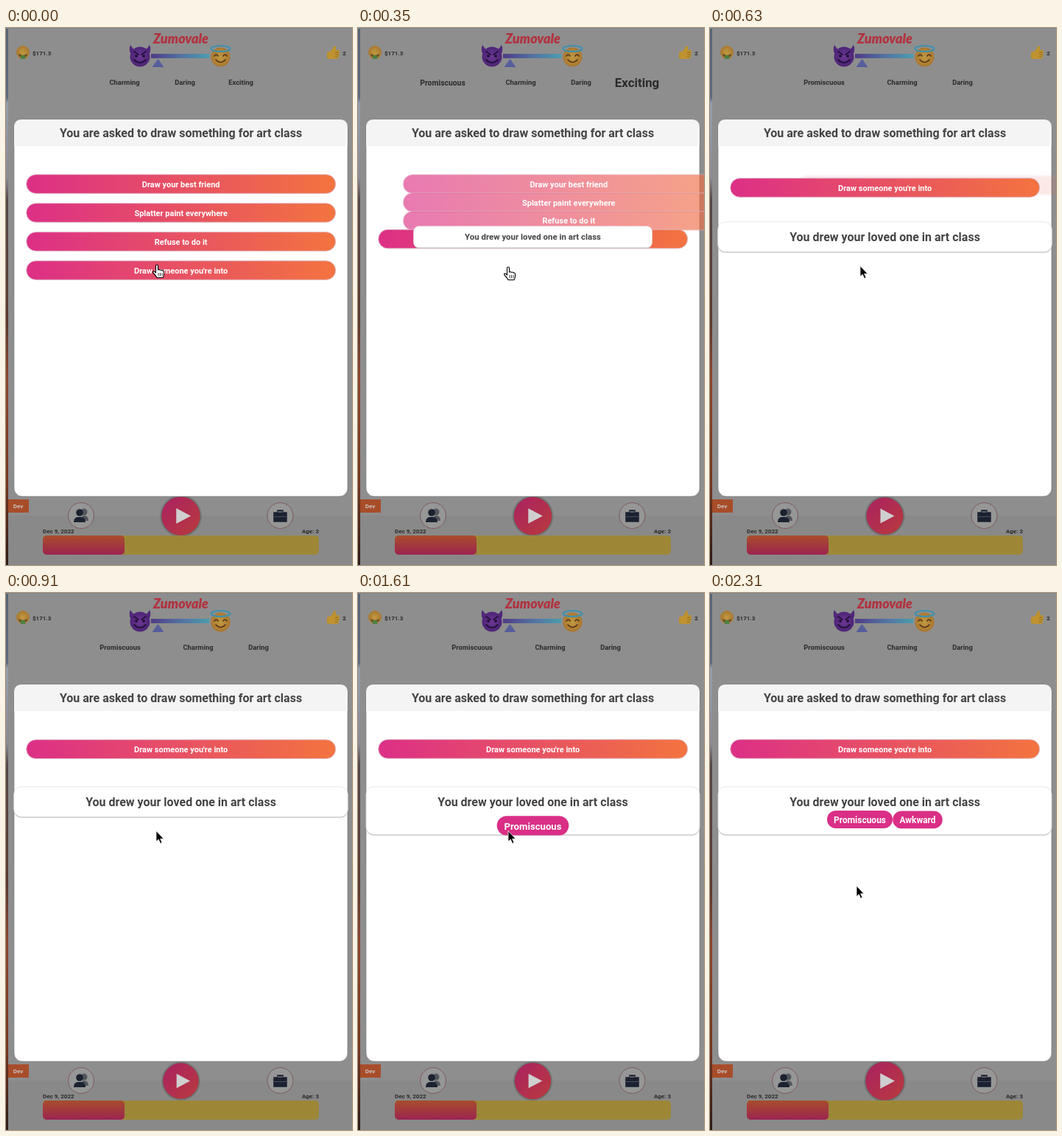
Recreate the animation shown at these times as an HTML page. Size 470 by 728 pixels, loop 2.38 s.

```html
<!DOCTYPE html>
<html lang="en">
<head>
<meta charset="utf-8">
<title>Art class</title>
<style>
  html, body { margin: 0; width: 100%; height: 100%; overflow: hidden; background: #8e8e8e; }
  svg { display: block; width: 100vw; height: 100vh; }
  text { font-family: Roboto, "Liberation Sans", sans-serif; font-weight: 700; }
  .logo { font: italic 900 18px Lato, sans-serif; }
</style>
</head>
<body>
<svg id="stage" viewBox="0 0 470 728">
  <defs>
    <linearGradient id="btn"><stop stop-color="#dc2f87"/><stop offset="1" stop-color="#f3743f"/></linearGradient>
    <linearGradient id="mood"><stop stop-color="#4f3c86"/><stop offset=".5" stop-color="#5470a2"/><stop offset="1" stop-color="#4a9cac"/></linearGradient>
    <linearGradient id="play" x2="1" y2="1"><stop stop-color="#a92262"/><stop offset="1" stop-color="#b93a3c"/></linearGradient>
    <linearGradient id="life" x2="0" y2="1"><stop stop-color="#a94d2c"/><stop offset="1" stop-color="#9c2450"/></linearGradient>
    <linearGradient id="edge" x2="0" y2="1">
      <stop stop-color="#56667a"/><stop offset=".13" stop-color="#5c6c80"/><stop offset=".14" stop-color="#969eac"/>
      <stop offset=".28" stop-color="#8a8c96"/><stop offset=".32" stop-color="#54484a"/><stop offset=".55" stop-color="#5c3a30"/>
      <stop offset=".65" stop-color="#8c4630"/><stop offset=".85" stop-color="#743620"/><stop offset="1" stop-color="#2c1c18"/>
    </linearGradient>
    <radialGradient id="gold"><stop stop-color="#c09a42"/><stop offset="1" stop-color="#a9772f"/></radialGradient>
    <radialGradient id="violet"><stop stop-color="#6c3794"/><stop offset="1" stop-color="#4d2477"/></radialGradient>
    <radialGradient id="halo"><stop offset=".85" stop-opacity=".35"/><stop offset="1" stop-opacity="0"/></radialGradient>
  </defs>

  <rect width="470" height="728" fill="#8e8e8e"/>
  <rect y="661" width="470" height="67" fill="#898989"/>
  <rect width="3" height="728" fill="url(#edge)"/>
  <rect width="470" height="1" fill="#7b8791"/>

  <!-- money face -->
  <circle cx="23" cy="33" r="9" fill="url(#gold)"/>
  <path d="M17 35q6 4 12 0q-1 5-6 5t-6-5" fill="#563b22"/>
  <path d="M20 37h6v5h-6z" fill="#4c8045"/>
  <!-- devil -->
  <g fill="url(#violet)">
    <path d="M170 36q-4-7-1-13q3 6 9 7zM194 36q4-7 1-13q-3 6-9 7z"/>
    <circle cx="182" cy="39" r="13.5"/>
  </g>
  <path d="M174 32l6 4M190 32l-6 4M174 43q8 8 16 0" fill="none" stroke="#25123c" stroke-width="1.8" stroke-linecap="round"/>
  <circle cx="177" cy="38" r="2" fill="#25123c"/><circle cx="187" cy="38" r="2" fill="#25123c"/>
  <!-- mood scale -->
  <rect x="197" y="35" width="79" height="6" fill="url(#mood)"/>
  <path d="M206.500 42l8 11h-16z" fill="#565f9c"/>
  <!-- angel -->
  <circle cx="291.500" cy="39.500" r="13" fill="url(#gold)"/>
  <ellipse cx="291.500" cy="28" rx="13" ry="4" fill="none" stroke="#3f90ae" stroke-width="2"/>
  <path d="M283 38q2.500-4 5 0M295 38q2.500-4 5 0M285 43q6.500 7 13 0" fill="none" stroke="#553219" stroke-width="1.6" stroke-linecap="round"/>
  <!-- thumb -->
  <path d="M436 33l5-2q4-3 4-7q4-1 3 6h4q2 1 1 3l-1 7q-1 2-4 2h-8l-4-1z" fill="#bd922f"/>
  <path d="M447 33h5M447 36h5M447 39h4" stroke="#936a24"/>

  <!-- footer -->
  <rect x="3" y="639" width="28" height="18" fill="#a84d2a"/>
  <g fill="#969696" stroke="#80585a"><circle cx="102" cy="661" r="17.500"/><circle cx="372.500" cy="661" r="17.500"/></g>
  <g fill="#53565d"><circle cx="106" cy="656" r="4.500"/><path d="M102 668q0-8 5-7q5 1 5 7z"/></g>
  <g fill="#1b2130"><circle cx="100" cy="657" r="4.800"/><path d="M92 670q0-6 5-7h6q5 1 5 7z"/></g>
  <path d="M364 657h17v12h-17zM369 657v-3h7v3" fill="#1b2130" stroke="#1b2130" stroke-width="1.500"/>
  <path d="M369 656h7" stroke="#969696"/><path d="M364 662.500h17" stroke="#555963" stroke-width=".8"/>
  <g id="pulse">
    <circle r="28" fill="url(#halo)"/><circle r="25" fill="url(#play)"/>
    <path d="M-6-10L13 0L-6 10z" fill="#cfcfcf"/>
  </g>
  <rect x="50" y="688" width="375" height="26" rx="5" fill="#9d8737"/>
  <rect x="50" y="688" width="111" height="26" rx="5" fill="url(#life)"/>
  <g id="labels"></g>
  <g id="traits"></g>

  <!-- dialog -->
  <rect x="11" y="124" width="453" height="511" rx="11" fill="#fff" stroke="#777" stroke-width=".6"/>
  <path d="M11 160V135q0-11 11-11H453q11 0 11 11V160z" fill="#f4f4f4"/>
  <g id="dialog"></g>
  <g id="result">
    <rect id="shade" x="-226.500" y="-19" width="453" rx="10" fill="#c4c4c4"/>
    <rect id="card" x="-226.500" y="-20.500" width="453" rx="10" fill="#fff" stroke="#e2e2e2" stroke-width=".8"/>
  </g>
  <g id="pills"></g>

  <g id="hand" fill="#fff" stroke="#000" stroke-width="1.100" stroke-linejoin="round">
    <path d="M-1.500 10V1.500q0-1.500 1.500-1.500t1.500 1.500V7q1.500-1.200 3 .3q1.500-.8 2.800.6q2-.3 2.200 1.600V13q0 2-1.500 4.500H0Q-2 14-5 11q-1-2 .5-2.200q1.500 0 3 2.200z"/>
    <path d="M2 11v4M4.500 11v4M7 11v4" stroke-width=".8"/>
  </g>
  <path id="arrow" d="M0 0V14.500L3.300 11.500L5.600 17L8 16L5.700 10.700H10.200z" stroke="#fff" stroke-width=".8"/>
</svg>
<script>
const LOOP = 2380, STEP = 70;
const EXIT = 253, MOUNT = 243, SHIFT = 595, PILL1 = 1363, PILL2 = 1790;
const $ = id => document.getElementById(id);

function add(parent, tag, attrs, content = '') {
  const el = document.createElementNS('http://www.w3.org/2000/svg', tag);
  set(el, attrs);
  el.textContent = content;
  return parent.appendChild(el);
}
function set(el, attrs) {
  for (const k in attrs) el.setAttribute(k, attrs[k]);
}
// y is the middle of the capitals
function label(parent, str, x, y, size, fill, anchor = 'middle') {
  return add(parent, 'text', { x, y: y + size * .355, 'font-size': size, fill, 'text-anchor': anchor }, str);
}
function place(el, x, y, s = 1) {
  set(el, { transform: `translate(${x} ${y}) scale(${s})`, visibility: s > .005 ? 'visible' : 'hidden' });
}
function keys(t, points) {
  let [t0, v0] = points[0];
  for (const [t1, v1] of points) {
    if (t < t1) {
      const u = Math.max(0, (t - t0) / (t1 - t0));
      return v0 + (v1 - v0) * u * u * (3 - 2 * u);
    }
    [t0, v0] = [t1, v1];
  }
  return v0;
}
// springs from 0 to 1: without and with overshoot
function settle(t) {
  const u = Math.max(0, t) * .0131;
  return 1 - (1 + u) * Math.exp(-u);
}
function pop(t) {
  if (t <= 0) return 0;
  const w = t * .0137;
  return 1 - Math.exp(-t * .01) * (Math.cos(w) + .73 * Math.sin(w));
}

const info = $('labels'), ink = '#2b2b2b';
set(label(info, 'Zumovale', 237.5, 15, 18, '#b3313f'), { class: 'logo' });
label(info, '$171.3', 36, 34, 8, ink, 'start');
label(info, '2', 459.5, 34, 8, ink);
label(info, 'Dec 9, 2022', 50, 682.5, 8, ink, 'start');
label(info, 'Age: 3', 425, 682.5, 8, ink, 'end');
label(info, 'Dev', 16.5, 648.5, 8, '#c9c2bf');
label($('dialog'), 'You are asked to draw something for art class', 237.5, 142.5, 16, '#444');
label($('result'), 'You drew your loved one in art class', 0, 0, 16, '#444');

const traits = ['Promiscuous', 'Charming', 'Daring', 'Exciting'].map(s => {
  const g = add($('traits'), 'g', {});
  label(g, s, 0, 0, 9.4, ink);
  return g;
});

const buttons = ['Draw your best friend', 'Splatter paint everywhere', 'Refuse to do it', "Draw someone you're into"].map(s => {
  const g = add($('dialog'), 'g', {});
  const rect = add(g, 'rect', { y: -12.8, width: 420, height: 25.6, rx: 12.8, fill: 'url(#btn)', stroke: '#dcb3c3', 'stroke-width': .9 });
  return { g, rect, text: label(g, s, 210, .3, 11, '#fff') };
});

const pills = [['Promiscuous', 89], ['Awkward', 68]].map(([s, w]) => {
  const g = add($('pills'), 'g', {});
  add(g, 'rect', { x: -w / 2, y: -12, width: w, height: 24, rx: 12, fill: '#da2f86' });
  label(g, s, 0, .5, 12, '#fff');
  return g;
});

function draw(t) {
  place($('pulse'), 237.5, 661.5, 1 + .045 * Math.cos(2 * Math.PI * t / LOOP));

  const shift = t < MOUNT ? -60 : t < SHIFT ? 0 : 40;
  const grow = keys(t, [[235, 0], [450, 2], [620, 1]]);
  const shrink = keys(t, [[230, 1], [300, 1.95], [590, 0]]);
  [115, 221, 303, 379].forEach((x, i) => place(traits[i], x + shift, 74, [grow, 1, 1, shrink][i]));

  const p = settle(t - EXIT), gap = 39 * (1 - p);
  buttons.forEach(({ g, rect, text }, i) => {
    const leaving = i < 3 && t > EXIT, w = leaving ? 450 : 420;
    place(g, leaving ? 25 + 100 * p : 27.7, 211.5 + gap * i);
    set(g, { opacity: leaving ? (p > .99 ? 0 : 1 - p) : 1 });
    set(rect, { width: w });
    set(text, { x: w / 2 });
  });

  place($('result'), 237.5, 283.3, pop(t - MOUNT));
  const height = t < PILL1 ? 40.5 : 64.5;
  set($('card'), { height });
  set($('shade'), { height });

  const pair = t >= PILL2;
  place(pills[0], pair ? 203.5 : 237.5, 307 + 50 * (1 - settle(t - PILL1)), pop(t - PILL1));
  place(pills[1], 282, 307 + 50 * (1 - settle(t - PILL2)), pop(t - PILL2));

  const near = keys(t, [[0, 0], [210, 1]]), away = keys(t, [[1750, 0], [2200, 1]]);
  place($('hand'), 205 - near, 321 + 3 * near, t < SHIFT ? 1 : 0);
  place($('arrow'), 204 - 5 * away, 322.5 + 74.5 * away, t < SHIFT ? 0 : 1);
}

const start = performance.now();
function tick() {
  const t = (performance.now() - start) % LOOP;
  draw(Math.floor(t / STEP) * STEP);
  requestAnimationFrame(tick);
}
tick();
</script>
</body>
</html>
```
